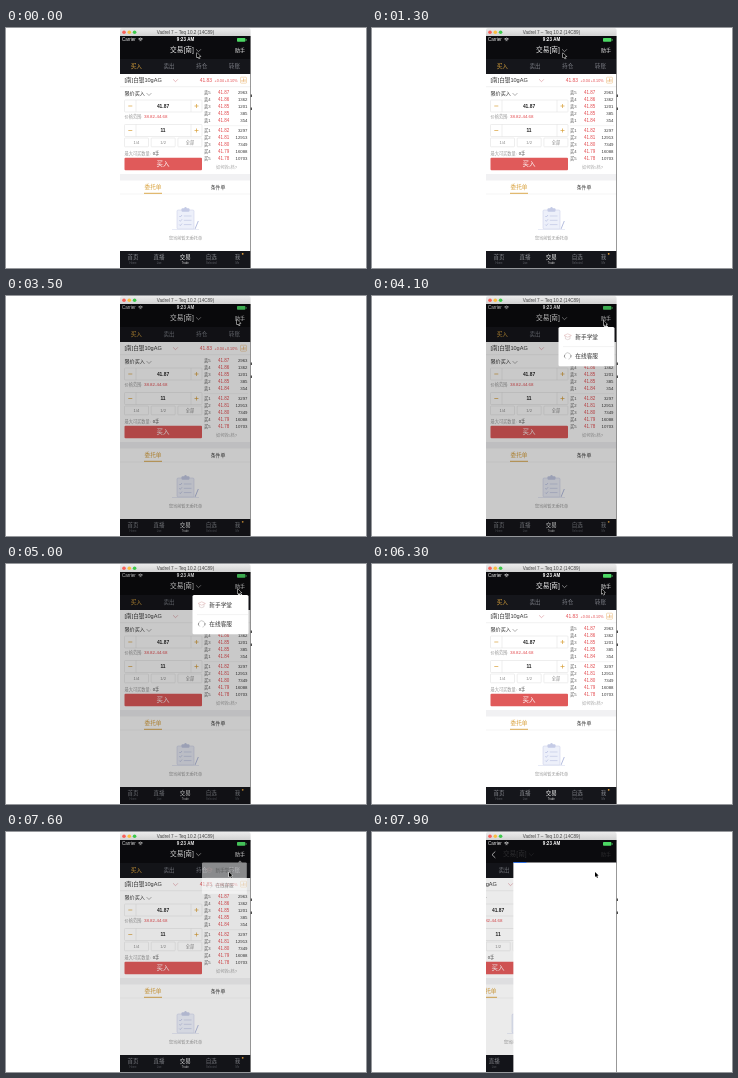
An HTML page with a canvas that plays this animation: 360x240 px, repeating every 8 s.

```html
<!DOCTYPE html>
<html lang="zh-CN">
<head>
<meta charset="utf-8">
<title>Trading screen</title>
<style>
html, body { margin: 0; height: 100%; overflow: hidden; background: #fff; }
canvas { display: block; width: 360px; height: 240px; }
</style>
</head>
<body>
<canvas></canvas>
<script>
const canvas = document.querySelector('canvas');
const c = canvas.getContext('2d');
const dpr = Math.max(1, window.devicePixelRatio || 1);
canvas.width = 360 * dpr;
canvas.height = 240 * dpr;

const LOOP = 8000, STEP = 100;
const L = 114, R = 244.6, W = R - L;
const FONT = '"Liberation Sans", "Noto Sans CJK SC", "Noto Sans CJK", sans-serif';
const GOLD = '#d9a13b', RED = '#e2474b', INK = '#333', GREY = '#999', NIGHT = '#15161b';

const clamp = v => Math.min(1, Math.max(0, v));
const ramp = (t, a, b) => clamp((t - a) / (b - a));
const ease = p => p * p * (3 - 2 * p);

function rect(x, y, w, h, color) {
  c.fillStyle = color;
  c.fillRect(x, y, w, h);
}
function round(x, y, w, h, r, fill, stroke) {
  c.beginPath();
  c.roundRect(x, y, w, h, r);
  if (fill) { c.fillStyle = fill; c.fill(); }
  if (stroke) { c.strokeStyle = stroke; c.lineWidth = 0.5; c.stroke(); }
}
function dot(x, y, r, color) {
  c.beginPath();
  c.arc(x, y, r, 0, 7);
  c.fillStyle = color;
  c.fill();
}
function line(points, color, width = 0.6) {
  c.beginPath();
  for (let i = 0; i < points.length; i += 2) c.lineTo(points[i], points[i + 1]);
  c.strokeStyle = color;
  c.lineWidth = width;
  c.stroke();
}
function text(s, x, y, size, color, align = 'center', weight = 400) {
  c.font = `${weight} ${size}px ${FONT}`;
  c.textAlign = align;
  c.textBaseline = 'middle';
  c.fillStyle = color;
  c.fillText(s, x, y);
}
const chevron = (x, y, color) => line([x - 2.4, y - 1.2, x, y + 1.2, x + 2.4, y - 1.2], color);

function windowBar() {
  const g = c.createLinearGradient(0, 0, 0, 8);
  g.addColorStop(0, '#ececec');
  g.addColorStop(1, '#d2d2d2');
  round(L, 0, W, 10, [2, 2, 0, 0], g);
  ['#f9605a', '#fbbd3f', '#3dc94b'].forEach((col, i) => dot(118 + i * 5.3, 4.2, 1.8, col));
  text('Vadrel 7 – Teq 10.2 (14C89)', 179.5, 4.5, 4.6, '#444');
}

function statusBar() {
  rect(L, 8, W, 23, '#0b0b0e');
  text('Carrier', 116, 12, 4.5, '#eee', 'left');
  c.lineWidth = 0.7;
  c.strokeStyle = '#eee';
  for (const r of [1, 2.2, 3.4]) {
    c.beginPath();
    c.arc(134.5, 13.6, r, -2.3, -0.84);
    c.stroke();
  }
  text('9:23 AM', 179.5, 12, 4.5, '#fff', 'center', 700);
  round(231, 10, 8.4, 3.8, 0.8, '#4cd964');
  rect(239.8, 11.2, 0.8, 1.5, '#4cd964');
}

function navBar(push) {
  c.globalAlpha = 1 - push * 1.08;
  text('交易[南]', 176 - 42 * push, 22.5, 6.7, '#eee');
  chevron(192.5 - 42 * push, 22.5, '#ccc');
  text('助手', 234, 22.5, 5, '#eee');
  c.globalAlpha = push;
  line([123.3, 19.5, 120, 22.7, 123.3, 25.9], '#ddd', 0.9);
  c.globalAlpha = 1;
}

function stepper(y, value) {
  round(118.5, y, 77.5, 12, 0.8, '#fff', '#ddd');
  line([130, y, 130, y + 12], '#ddd', 0.5);
  line([185, y, 185, y + 12], '#ddd', 0.5);
  const m = y + 6;
  line([122.3, m, 126.3, m], GOLD, 0.7);
  line([188.5, m, 192.5, m], GOLD, 0.7);
  line([190.5, m - 2, 190.5, m + 2], GOLD, 0.7);
  text(value, 157, m + 0.2, 4.9, '#222', 'center', 700);
}

const asks = [[41.87, 2963], [41.86, 1362], [41.85, 1201], [41.85, 385], [41.84, 354]];
const bids = [[41.82, 3297], [41.81, 12913], [41.80, 7349], [41.79, 16088], [41.78, 10703]];

function bookRow(label, [price, size], y) {
  text(label, 198, y, 4.2, '#555', 'left');
  text(price.toFixed(2), 212, y, 4.5, RED, 'left');
  text(size, 241.5, y, 4.3, INK, 'right');
}

function clipboard() {
  round(171, 182, 17, 19, 1.2, '#edf0fa', '#c5cbe6');
  round(175.5, 180.3, 8, 3.4, 1, '#c5cbe6');
  dot(179.5, 180.3, 1.2, '#c5cbe6');
  for (const y of [188, 192.3, 196.6]) {
    line([173.3, y, 174.3, y + 1, 176, y - 1], '#a9b2da', 0.6);
    line([177.8, y, 185.5, y], '#c0c7e4', 0.7);
  }
  line([166, 201.5, 193, 201.5], '#dfe3f2', 0.7);
  line([189, 201, 192.3, 193], '#b6bedf', 1);
}

function tradePage() {
  rect(L, 31, W, 209, '#fff');
  rect(L, 31, W, 15, NIGHT);
  ['买入', '卖出', '持仓', '转账'].forEach((s, i) =>
    text(s, 130.3 + i * 32.7, 38.5, 5.6, i ? '#777980' : GOLD));

  text('[南]白银10gAG', 118.5, 52.5, 5.6, INK, 'left');
  chevron(169.5, 52.5, '#d98b94');
  text('41.83', 193.8, 52.5, 4.9, RED, 'left');
  text('+0.04 +0.10%', 208.5, 52.5, 3.7, RED, 'left');
  round(234.5, 49.2, 6, 6, 0.7, null, '#e9b878');
  line([236, 53.8, 236, 52], '#e39a45');
  line([237.5, 53.8, 237.5, 50.5], '#e39a45');
  line([239, 53.8, 239, 51.3], '#e39a45');
  line([L, 58.7, R, 58.7], '#e8e8e8', 0.6);

  text('限价买入', 118.5, 66, 5.1, INK, 'left');
  chevron(143, 66.3, '#777');
  stepper(72, '41.87');
  text('价格范围: ', 118.5, 89, 4.2, GREY, 'left');
  text('38.82-44.68', 138, 89, 4.4, RED, 'left');
  stepper(96.5, '11');
  ['1/4', '1/2', '全部'].forEach((s, i) => {
    round(118.5 + i * 26.7, 110, 24, 8.8, 0.6, '#fff', '#ddd');
    text(s, 130.5 + i * 26.7, 114.6, 4.2, '#888');
  });
  text('最大可买数量: ', 118.5, 125.4, 4.2, GREY, 'left');
  text('0手', 146.7, 125.4, 4.2, INK, 'left');
  round(118.5, 129.7, 77.5, 12.5, 1, '#e05a5a');
  text('买入', 157, 136.2, 6.5, '#fff');

  asks.forEach((row, i) => bookRow('卖' + (5 - i), row, 65 + i * 7));
  line([198, 97.7, 242, 97.7], '#e8e8e8', 0.5);
  bids.forEach((row, i) => bookRow('买' + (i + 1), row, 103 + i * 6.9));
  text('如何转5档?', 220.5, 140.3, 4.1, '#aaa');

  rect(L, 146, W, 6.5, '#f1f1f3');
  text('委托单', 147, 159.7, 5.6, GOLD);
  text('条件单', 212, 159.7, 4.9, INK);
  line([L, 166, R, 166], '#e8e8e8', 0.5);
  line([138, 165.3, 156, 165.3], GOLD, 0.9);
  clipboard();
  text('您当前暂无委托单', 179.5, 210.5, 4.15, '#999');

  rect(L, 223, W, 17, NIGHT);
  [['首页', 'Home'], ['直播', 'Live'], ['交易', 'Trade'], ['自选', 'Selected'], ['我', 'Me']]
    .forEach(([zh, en], i) => {
      const x = 127 + i * 26.1, col = i == 2 ? '#fff' : '#85878d';
      text(zh, x, 229.3, 5.5, col);
      text(en, x, 235.3, 2.7, i == 2 ? '#ddd' : '#5d5f66');
    });
  dot(236.7, 225.8, 0.9, '#e8a33d');
}

function menu(p) {
  if (p <= 0) return;
  c.save();
  c.globalAlpha = p;
  c.translate(234, 28);
  c.scale(0.6 + 0.4 * p, 0.6 + 0.4 * p);
  c.translate(-234, -28);
  round(186.5, 31, 56, 39.3, 1.5, '#fff');
  c.beginPath();
  c.moveTo(231.5, 31.2);
  c.lineTo(234, 28.5);
  c.lineTo(236.5, 31.2);
  c.fill();
  line([191, 50.6, 242, 50.6], '#e6e6e6', 0.5);
  line([192, 39.5, 195.7, 37.8, 199.4, 39.5, 195.7, 41.2, 192, 39.5], '#d9a9a9', 0.5);
  line([193.4, 40.3, 193.4, 42.8, 195.7, 43.7, 198, 42.8, 198, 40.3], '#c9b4b4', 0.5);
  c.beginPath();
  c.arc(195.7, 60, 3.2, 2.2, 7.6);
  c.strokeStyle = '#aaa';
  c.lineWidth = 0.6;
  c.stroke();
  line([192.5, 59, 192.5, 61.3], '#999', 1);
  line([198.9, 59, 198.9, 61.3], '#999', 1);
  text('新手学堂', 203.3, 41, 5.7, INK, 'left');
  text('在线客服', 203.3, 60.3, 5.7, INK, 'left');
  c.restore();
}

// Keys: time, x, y
const path = [
  [0, 191, 24.8], [2700, 191, 25], [3300, 231, 23.5], [3600, 231, 23.8], [4400, 232, 25],
  [5100, 232, 25], [5600, 229.5, 25], [6300, 229.5, 25], [6600, 228, 25],
  [6900, 228, 25], [7400, 223, 40], [8000, 223, 40]
];
function cursor(t) {
  const i = path.findIndex(k => k[0] > t);
  const [t0, x0, y0] = path[i - 1], [t1, x1, y1] = path[i];
  const p = ease(ramp(t, t0, t1));
  c.save();
  c.translate(x0 + (x1 - x0) * p, y0 + (y1 - y0) * p);
  c.beginPath();
  [[0, 0], [0, 5], [1.2, 4], [2, 5.9], [2.9, 5.5], [2.1, 3.7], [3.6, 3.6]].forEach(k => c.lineTo(...k));
  c.closePath();
  c.strokeStyle = '#fff';
  c.lineWidth = 1;
  c.stroke();
  c.fillStyle = '#000';
  c.fill();
  c.restore();
}

function draw(t) {
  const shade = ramp(t, 3300, 3500) - ramp(t, 5200, 5400) + ramp(t, 6300, 6500) - ramp(t, 7500, 7700);
  const open = ramp(t, 3500, 3700) - ramp(t, 5200, 5400) + ramp(t, 6400, 6600) - ramp(t, 7500, 7700);
  const push = t > 7700 ? 1 - Math.exp((7700 - t) / 128) : 0;

  c.setTransform(dpr, 0, 0, dpr, 0, 0);
  rect(0, 0, 360, 240, '#fff');
  windowBar();
  c.save();
  c.beginPath();
  c.rect(L, 8, W, 232);
  c.clip();
  statusBar();
  navBar(push);
  c.save();
  c.translate(-0.3 * W * push, 0);
  tradePage();
  c.restore();
  if (push) {
    const x = L + W * (1 - push);
    rect(L, 31, W, 209, `rgba(0,0,0,${0.1 * push})`);
    rect(x, 30.5, W, 210, '#fff');
    rect(x, 30, 13, 1, '#2f6fe0');
  }
  rect(L, 8, W, 232, `rgba(0,0,0,${0.21 * shade})`);
  menu(open);
  c.restore();

  rect(244.4, 8, 0.6, 232, '#555');
  rect(244.8, 66.5, 1, 2.5, '#222');
  rect(244.8, 79.5, 1, 2.5, '#222');
  cursor(t);
}

function tick() {
  const t = performance.now() % LOOP;
  draw(Math.floor(t / STEP) * STEP);
  requestAnimationFrame(tick);
}
tick();
</script>
</body>
</html>
```
